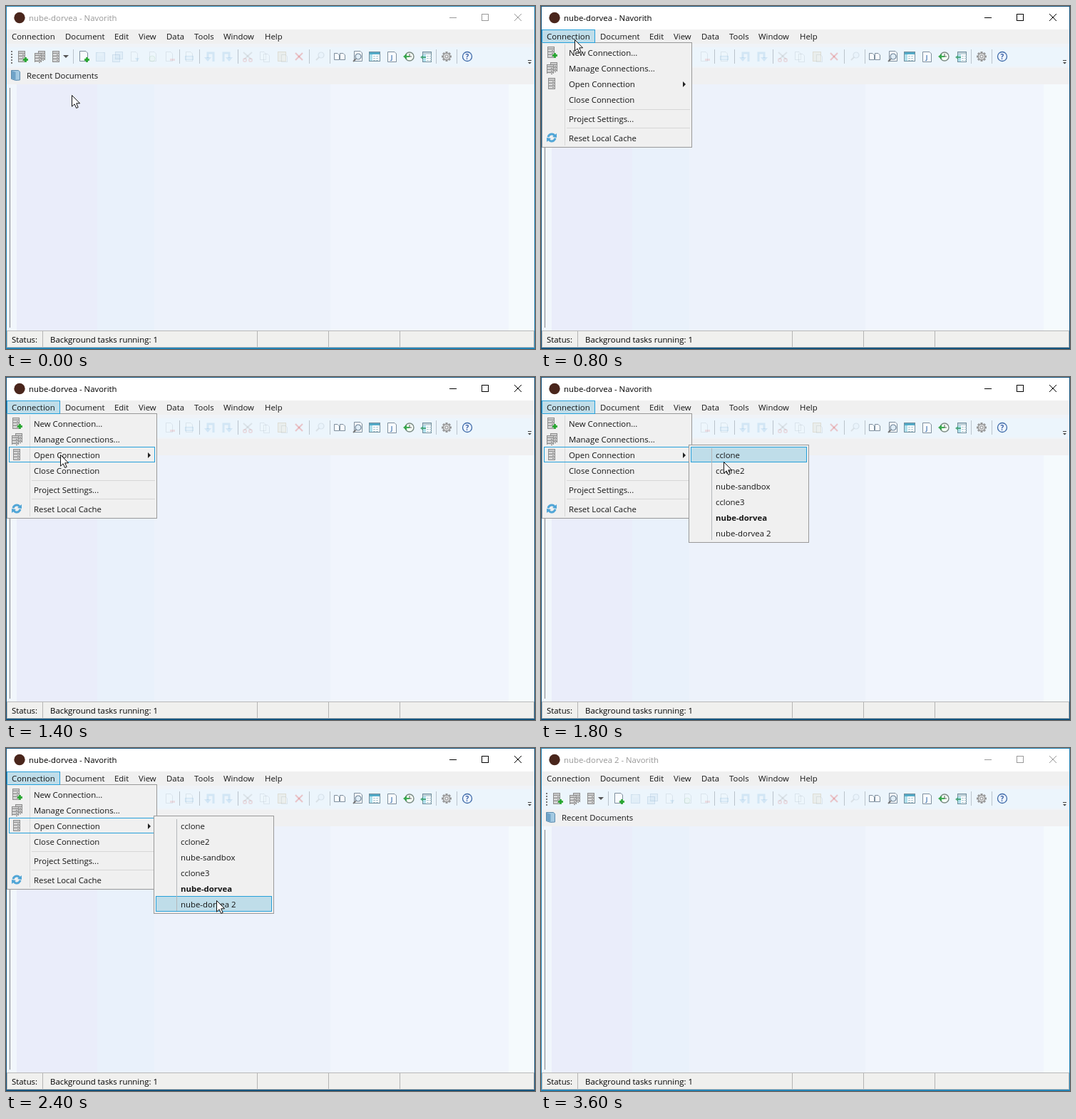
Write an HTML page with a canvas that moves like this. It is 742 px wide and 482 px high and loops after 3800 ms.

```html
<!DOCTYPE html>
<html lang="en">
<head>
<meta charset="utf-8">
<title>Open a connection</title>
<style>
  html, body { margin: 0; width: 100%; height: 100%; overflow: hidden; background: #fff; }
  canvas { display: block; }
</style>
</head>
<body>
<canvas id="stage" width="742" height="482"></canvas>
<script>
const ctx = document.getElementById('stage').getContext('2d');
const W = 742, H = 482, LOOP = 3800, STEP = 200;
const FONT = '"Open Sans", "Noto Sans", sans-serif';
const APP = 'Navorith', FIRST = 'nube-dorvea', SECOND = FIRST + ' 2';
const INK = '#141414', BLUE = '#26a0da', HOVER = '#bfdde9';
const FADED = .14, SOFT = .88;

// Pointer tip at each step; missing entries mean it has left the window.
const pointer = [
  [92, 125], [76, 94], [50, 50], [47, 47], [47, 47], [50, 62], [61, 85],
  [76, 109], [165, 111], [256, 119], [268, 150], [300, 210], [295, 214],
  [295, 222], [295, 241], [194, 447]
];

function fill(x, y, w, h, color) {
  ctx.fillStyle = color;
  ctx.fillRect(x, y, w, h);
}
function box(x, y, w, h, edge, inside) {
  if (inside) fill(x, y, w, h, inside);
  ctx.lineWidth = 1;
  ctx.strokeStyle = edge;
  ctx.strokeRect(x + .5, y + .5, w - 1, h - 1);
}
function text(s, x, y, color = INK, weight = 400) {
  ctx.font = `${weight} 11.4px ${FONT}`;
  ctx.fillStyle = color;
  ctx.fillText(s, x, y);
}
function poly(points, color, stroke, width = 1) {
  ctx.beginPath();
  points.forEach(([x, y], i) => i ? ctx.lineTo(x, y) : ctx.moveTo(x, y));
  if (color) {
    ctx.closePath();
    ctx.fillStyle = color;
    ctx.fill();
  }
  if (stroke) {
    ctx.lineWidth = width;
    ctx.strokeStyle = stroke;
    ctx.stroke();
  }
}
function ring(x, y, r, stroke, color, width = 1, from = 0, to = Math.PI * 2) {
  ctx.beginPath();
  ctx.arc(x, y, r, from, to);
  if (color) {
    ctx.fillStyle = color;
    ctx.fill();
  }
  if (stroke) {
    ctx.lineWidth = width;
    ctx.strokeStyle = stroke;
    ctx.stroke();
  }
}
// Runs an icon painter with its centre at the origin.
function at(x, y, paint, alpha = 1) {
  ctx.save();
  ctx.translate(x, y);
  ctx.globalAlpha = alpha;
  paint();
  ctx.restore();
}

function server(x = -5, y = -8, h = 16) {
  box(x, y, 10, h, '#858585', '#c9c9c9');
  for (let k = y + 3; k < y + h - 1; k += 4) {
    fill(x + 1, k, 8, 1, '#7a7a7a');
    fill(x + 1, k + 1, 8, 1, '#ededed');
    fill(x + 6, k + 2, 2, 1, '#707070');
  }
}
function plus(x, y) {
  fill(x - 1, y - 3, 3, 7, '#23a52c');
  fill(x - 3, y - 1, 7, 3, '#23a52c');
}
function page(x = -5, y = -7, w = 10, h = 14) {
  poly([[x + .5, y + .5], [x + w - 3, y + .5], [x + w - .5, y + 3], [x + w - .5, y + h - .5],
    [x + .5, y + h - .5], [x + .5, y + .5]], '#fbfdff', '#6f8090');
}
function lens(x, y, r) {
  poly([[x - r + 1, y + r - 1], [x - r - 3, y + r + 3]], null, '#6d6d6d', 2);
  ring(x, y, r, '#60758a', '#dcebf5', 1.2);
}
function letter(s, y, size, color) {
  ctx.font = `700 ${size}px ${FONT}`;
  ctx.textAlign = 'center';
  ctx.fillStyle = color;
  ctx.fillText(s, 0, y);
}
function grid(x, y, w, h, head) {
  box(x, y, w, h, '#5f7f90', '#fff');
  fill(x + 1, y + 1, w - 2, 3, head);
  fill(x + 1, y + 4, 4, h - 5, '#a5dcea');
  for (let k = y + 6; k < y + h - 1; k += 3) {
    for (let j = x + 6; j < x + w - 2; j += 4) fill(j, k, 3, 1, '#9dbdc8');
  }
}

const icon = {
  add() { server(-6, -8, 16); plus(4, 4); },
  many() { server(-2, -8, 13); server(-7, -5, 13); },
  server() { server(); },
  newPage() { page(-6, -8, 12, 15); plus(4, 4); },
  save() { box(-6, -6, 13, 13, '#5a7fa8', '#9dbddb'); fill(-3, -6, 7, 5, '#fff'); fill(-3, 2, 7, 4, '#dce6ef'); },
  saveAll() {
    box(-3, -7, 11, 11, '#5a7fa8', '#9dbddb');
    box(-7, -3, 11, 11, '#5a7fa8', '#9dbddb');
    fill(-5, -2, 7, 3, '#fff');
  },
  pageOut() { page(); poly([[1, 2], [7, 2], [4, 7]], '#3a8fd0'); },
  pageIn() { page(-4); ring(0, 3, 4, '#6dae77', '#d2ead0'); },
  pageRemove() { page(); fill(1, 3, 7, 3, '#d64848'); },
  print() { page(); box(-6, -1, 12, 6, '#4d8cb8', '#a9d3ec'); },
  undo() {
    poly([[-3, 2], [-3, -5], [5, -5], [5, 7]], null, '#3b91d0', 3);
    poly([[-8, 1], [2, 1], [-3, 7]], '#3b91d0');
  },
  redo() { ctx.scale(-1, 1); icon.undo(); },
  cut() {
    poly([[-6, -6], [5, 4]], null, '#777', 2);
    poly([[6, -6], [-5, 4]], null, '#777', 2);
    ring(-4, 5, 2.2, '#c33', null, 1.6);
    ring(4, 5, 2.2, '#c33', null, 1.6);
  },
  copy() { page(-7, -7, 9, 12); page(-2, -4, 9, 12); },
  paste() { box(-7, -7, 12, 14, '#957646', '#d2b786'); page(-2, -3, 9, 11); },
  remove() {
    poly([[-5, -5], [5, 5]], null, '#df3030', 2.2);
    poly([[5, -5], [-5, 5]], null, '#df3030', 2.2);
  },
  find() { lens(2, -2, 4); },
  pair() { page(-8, -5, 8, 10); page(0, -5, 8, 10); },
  look() { page(-5, -8, 12, 15); lens(1, 0, 4); },
  grid() { grid(-8, -7, 16, 14, '#3b9fc0'); },
  script() { page(-6, -7, 13, 15); letter('J', 4, 8, '#356caa'); },
  clock() {
    ring(1, 0, 6, '#6a7a72', '#f6fff5', 1.4);
    poly([[1, -4], [1, 0], [4, 0]], null, '#444');
    poly([[-8, 0], [-3, -4], [-3, -1], [1, -1], [1, 1], [-3, 1], [-3, 4]], '#27a33e');
  },
  sheet() {
    grid(-5, -7, 13, 15, '#b9ccd4');
    poly([[-8, 1], [-4, -2], [-4, 0], [0, 0], [0, 2], [-4, 2], [-4, 4]], '#3fa173');
  },
  gear() {
    for (let k = 0; k < 8; k++) {
      ctx.save();
      ctx.rotate(k * Math.PI / 4);
      fill(-1.5, -7, 3, 3, '#8c8c8c');
      ctx.restore();
    }
    ring(0, 0, 4.8, '#8c8c8c', '#d0d0d0');
    ring(0, 0, 2, '#8c8c8c', '#f4f7fa');
  },
  help() { ring(0, 0, 6.5, '#26579c', '#eef5ff', 1.3); letter('?', 4, 10, '#244f9a'); },
  refresh() {
    for (let k = 0; k < 2; k++) {
      ctx.rotate(Math.PI);
      ring(0, 0, 5, '#3a9bd3', null, 3, Math.PI * 1.05, Math.PI * 1.8);
      poly([[7, -6], [7, 0], [1, -1]], '#3a9bd3');
    }
  }
};

const tools = [
  ['add', 23], ['many', 47], ['server', 70], ['newPage', 109],
  ['save', 132, FADED], ['saveAll', 156, FADED], ['pageOut', 180, FADED], ['pageIn', 205, FADED],
  ['pageRemove', 229, FADED], ['print', 257, FADED], ['undo', 286, FADED], ['redo', 310, FADED],
  ['cut', 339, FADED], ['copy', 363, FADED], ['paste', 388, FADED], ['remove', 411, .24],
  ['find', 440, FADED], ['pair', 468], ['look', 493], ['grid', 517], ['script', 541],
  ['clock', 565], ['sheet', 589], ['gear', 618], ['help', 647]
];
const menus = [['Connection', 8], ['Document', 83], ['Edit', 152], ['View', 186],
  ['Data', 225], ['Tools', 264], ['Window', 305], ['Help', 363]];
const commands = [['New Connection...', 66, 'add'], ['Manage Connections...', 88, 'many'],
  ['Open Connection', 110, 'server'], ['Close Connection', 132],
  ['Project Settings...', 159], ['Reset Local Cache', 186, 'refresh']];
const connections = ['cclone', 'cclone2', 'nube-sandbox', 'cclone3', FIRST, SECOND];

function titleBar(active, name) {
  const color = active ? '#000' : '#999';
  fill(1, 1, W - 2, 32, '#fff');
  ring(19, 16.5, 7.7, null, '#4a261c');
  text(`${name} - ${APP}`, 32, 21, color);
  fill(622, 16, 10, 1, color);
  box(667, 11, 10, 10, color);
  poly([[713, 11], [723, 21]], null, color);
  poly([[723, 11], [713, 21]], null, color);
}
function menuBar(lit) {
  fill(1, 33, W - 2, 20, '#f0f0f0');
  if (lit) box(1, 33, 75, 19, BLUE, HOVER);
  for (const [label, x] of menus) text(label, x, 47);
}
function toolBar() {
  fill(1, 53, W - 2, 34, '#f0f3f7');
  fill(4, 58, 734, 27, '#ecf5fc');
  for (let y = 63; y < 80; y += 4) fill(7, y, 2, 2, '#777');
  for (const x of [94, 243, 271, 325, 425, 454, 603, 632]) fill(x, 61, 1, 20, '#bac3cb');
  for (const [name, x, alpha = SOFT] of tools) at(x, 71, icon[name], alpha);
  poly([[80, 69], [88, 69], [84, 73]], '#555');
  fill(732, 76, 5, 1, '#444');
  poly([[732, 79], [737, 79], [734.5, 81.5]], '#444');
}
function documents() {
  fill(1, 87, W - 2, 23, '#f0f0f1');
  poly([[7.5, 90.5], [17.5, 90.5], [19.5, 92.5], [19.5, 104], [13.5, 104.5], [7.5, 102.5]], '#a3c9e2', '#5d8cae');
  poly([[8, 91], [13.5, 93], [13.5, 104], [8, 102]], '#6fa3c8');
  text('Recent Documents', 29, 102);
  const bands = [[1, '#f1f6fc'], [15, '#eaedfa'], [128, '#e9f1fb'], [208, '#edf2fb'],
    [455, '#f1f5fd'], [705, '#f5fafd']];
  for (const [x, color] of bands) fill(x, 110, W - 1 - x, 346, color);
  fill(5, 115, 1, 337, '#858589');
}
function statusBar() {
  fill(1, 456, W - 2, 24, '#f0f0ee');
  fill(1, 456, W - 2, 1, '#b8b8b8');
  fill(1, 479, W - 2, 1, '#c4c4c4');
  for (const x of [1, 51, 352, 452, 552, 740]) fill(x, 457, 1, 22, '#b4b4b4');
  text('Status:', 8, 473, '#000');
  text('Background tasks running: 1', 62, 473, '#000');
}
function mainMenu(hover) {
  box(1, 51, 211, 148, '#999', '#f0f0f0');
  fill(2, 51, 74, 1, BLUE);
  fill(33, 54, 1, 142, '#d7d7d7');
  for (const y of [145, 171]) fill(36, y, 173, 1, '#d7d7d7');
  commands.forEach(([label, y, name], i) => {
    if (i === hover) box(4, y - 12, 205, 22, BLUE, i === 2 ? null : HOVER);
    if (name) at(15, y - 1, icon[name], SOFT);
    text(label, 39, y + 4);
  });
  poly([[199, 106], [203, 110], [199, 114]], '#222');
}
function subMenu(hover) {
  box(207, 95, 169, 138, '#999', '#f0f0f0');
  if (hover >= 0) box(210, 98 + hover * 22, 163, 22, BLUE, HOVER);
  fill(239, 100, 1, 129, '#b4b8ba');
  connections.forEach((label, i) => text(label, 245, 114 + i * 22, INK, label === FIRST ? 700 : 400));
}
function arrow([x, y]) {
  const shape = [[.5, .5], [.5, 16.2], [4.1, 12.8], [6.7, 18.5], [9.2, 17.4], [6.7, 11.8], [11.6, 11.8]];
  at(x, y, () => poly([...shape, shape[0]], '#fff', '#111'));
}

function draw(time) {
  const step = Math.floor((time % LOOP) / STEP);
  const active = step >= 3 && step < 18;
  const open = step >= 3 && step < 13;
  const tip = pointer[step];

  fill(0, 0, W, H, active ? '#16557f' : '#2586b8');
  titleBar(active, step < 14 ? FIRST : SECOND);
  menuBar(step === 2 || open);
  toolBar();
  documents();
  statusBar();
  if (open) {
    mainMenu(step < 5 ? -1 : Math.min(step - 5, 2));
    if (step >= 8) subMenu(step < 9 ? -1 : Math.floor((tip[1] - 98) / 22));
  }
  if (tip) arrow(tip);
}

function frame() {
  draw(performance.now());
  requestAnimationFrame(frame);
}
frame();
</script>
</body>
</html>
```
